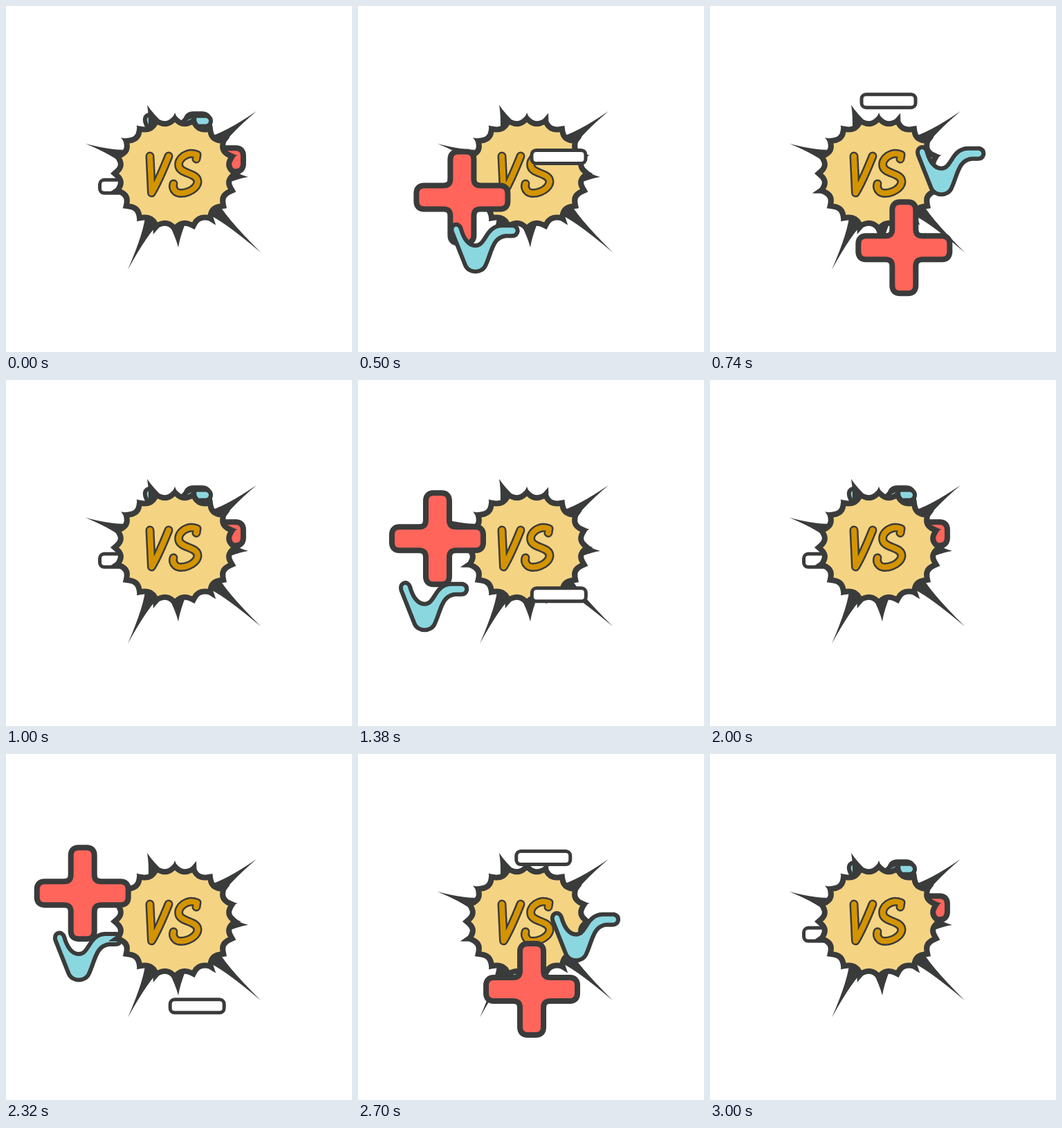
An HTML page for the animation above (3.02 s loop, 500x500 px).

```html
<!DOCTYPE html>
<html lang="en">
<head>
<meta charset="utf-8">
<title>VS</title>
<style>
html, body { margin: 0; width: 100%; height: 100%; overflow: hidden; background: #fff; }
svg { display: block; width: 100vw; height: 100vh; }
.item { stroke: #3a3b3b; paint-order: stroke; stroke-linejoin: round; }
#spikes { fill: #3a3b3b; }
#body { fill: #f4d483; stroke: #3a3b3b; stroke-width: 16; paint-order: stroke; stroke-miterlimit: 2; }
#letters { fill: none; stroke-linecap: round; stroke-linejoin: round; }
</style>
</head>
<body>
<svg viewBox="0 0 500 500">
  <defs>
    <path id="orbit" d="M-140.2 0A140.2 59.5 0 0 0 140.2 0A140.2 59.5 0 0 0 -140.2 0"/>
    <g id="vs">
      <path d="M208 217L210.5 270Q221 252 235 217"/>
      <path d="M275 221L276 215C262 209 247 221 250 232C253 243 277 241 277 254C276 267 252 275 245 268Q240 263 242 257"/>
    </g>
  </defs>
  <g id="back"></g>
  <path id="spikes"/>
  <path id="body"/>
  <g id="letters" role="img" aria-label="VS">
    <use href="#vs" stroke="#3a3b3b" stroke-width="13"/>
    <use href="#vs" stroke="#d49400" stroke-width="8"/>
  </g>
  <g id="front">
    <path id="plus" class="item" fill="#ff655b" stroke-width="16"/>
    <path id="bowl" class="item" fill="#8bd7e0" stroke-width="12" d="M-38 -28C-34 -13 -26 -1 -14 -1C4 -1 2 -29 24 -30H40Q44 -29 44 -25Q43 -21 39 -21H30C8 -19 7 4 -2 23C-6 33 -22 33 -26 23L-45 -25C-47 -32 -40 -34 -38 -28Z"/>
    <rect id="bar" class="item" fill="#fff" stroke-width="10" x="-36.5" y="-7" width="73" height="14" rx="4"/>
  </g>
</svg>
<script>
const $ = id => document.getElementById(id);
const TAU = 2 * Math.PI;
const CX = 244, CY = 242, CUSPS = 20;

// Point on the burst: angle clockwise from the top, scale 1 at the cusps
const rim = (angle, scale) =>
  [CX + 81 * scale * Math.sin(angle), CY - 74 * scale * Math.cos(angle)];
const step = TAU / CUSPS;

// A thorn with hollow sides that starts inside the body
function spike([x, y], half) {
  const r = Math.hypot(x - CX, y - CY), ux = (x - CX) / r, uy = (y - CY) / r;
  const at = (d, s) => `${CX + ux * d - uy * s} ${CY + uy * d + ux * s}`;
  const bend = Math.min(92, r - 8);
  return `M${at(70, -half)}Q${at(bend, -3)} ${x} ${y}Q${at(bend, 3)} ${at(70, half)}Z`;
}

let body = 'M' + rim(0, 1);
let thorns = '';
for (let i = 0; i < CUSPS; i++) {
  const angle = i * step;
  body += `Q${rim(angle + step / 2, 0.87)} ${rim(angle + step, 1)}`;
  thorns += spike(rim(angle, 1.19 + 0.06 * Math.sin(i * i)), 9);
}
for (const tip of [[115, 199], [204, 143], [362, 152], [350, 247], [368, 356], [249, 349], [176, 381]])
  thorns += spike(tip, 13);
$('body').setAttribute('d', body + 'Z');
$('spikes').setAttribute('d', thorns);

// One rounded arm of the plus, turned four times
let plus = '';
for (let i = 0; i < 4; i++) {
  const c = Math.cos(i * TAU / 4), s = Math.sin(i * TAU / 4);
  const at = (x, y) => `${x * c - y * s} ${x * s + y * c} `;
  plus += (i ? 'L' : 'M') + at(-13, -27) + 'L' + at(-13, -55) + 'Q' + at(-13, -62) + at(-6, -62)
    + 'L' + at(6, -62) + 'Q' + at(13, -62) + at(13, -55) + 'L' + at(13, -27) + 'Q' + at(13, -13) + at(27, -13);
}
$('plus').setAttribute('d', plus + 'Z');

// Three tilted copies of one orbit; the pace swells and slackens once or twice a turn
const items = [
  { el: $('plus'), tilt: 31, start: -.318, swing: .053, lag: .115, wobble: .006 },
  { el: $('bowl'), tilt: -31, start: -.3515, swing: .045, lag: -.142, wobble: -.005 },
  { el: $('bar'), tilt: -90, start: -.242, swing: .044, lag: .433, wobble: .025 }
];
const orbit = $('orbit'), size = orbit.getTotalLength();

function draw(now) {
  const t = Math.floor(now % 3020 / 20) * 20 % 1000 / 1000;
  for (const { el, tilt, start, swing, lag, wobble } of items) {
    const f = t + start + swing * Math.cos(TAU * (t - lag)) + wobble * Math.cos(2 * TAU * t);
    const share = (f + 1) % 1;
    const p = orbit.getPointAtLength(share * size);
    el.setAttribute('transform',
      `translate(234 265.5) rotate(${tilt}) translate(${p.x} ${p.y}) rotate(${-tilt})`);
    $(share < 0.5 ? 'front' : 'back').append(el);
  }
}

const begin = performance.now();
function tick() {
  draw(performance.now() - begin);
  requestAnimationFrame(tick);
}
tick();
</script>
</body>
</html>
```
